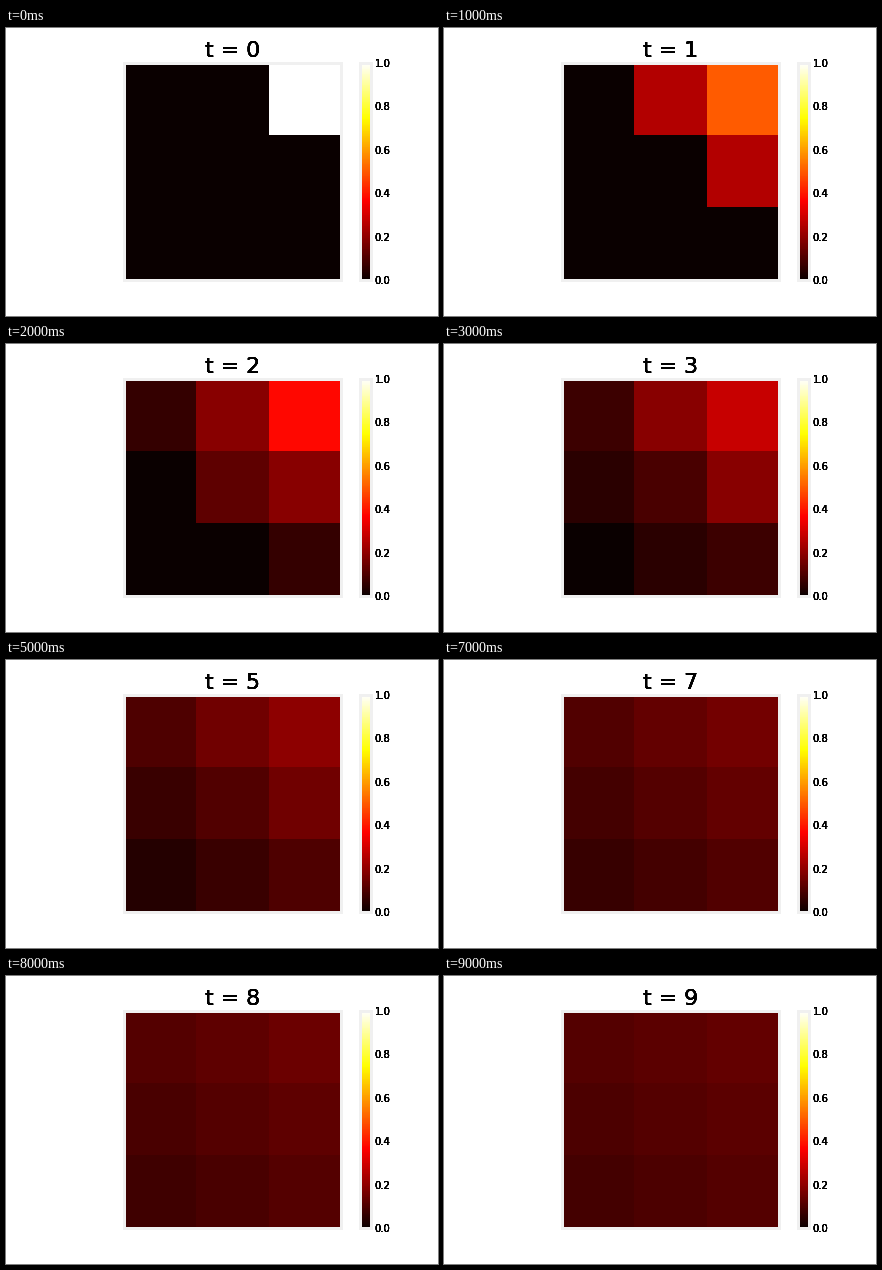
These frames come from a looping animation (432 px wide and 288 px high, 10000 ms). A matplotlib script:

```python
import numpy as np
import matplotlib.pyplot as plt
from matplotlib.animation import FuncAnimation

W, H, DPI = 432, 288, 72
N, STEPS = 3, 10
LAYERS = 6  # stacked text copies give hard, dark glyph edges

plt.rcParams.update({
    "font.family": "DejaVu Sans",
    "font.size": 10,
    "axes.edgecolor": "#f0f0f0",
    "axes.linewidth": 3,
    "axes.grid": False,
    "figure.subplot.left": 0.08,
    "figure.subplot.right": 0.95,
    "figure.subplot.bottom": 0.125,
    "figure.subplot.top": 0.88,
})


def diffuse(p):
    """One step of a random walk that stays put when it hits a wall."""
    q = np.pad(p, 1, mode="edge")
    return (q[:-2, 1:-1] + q[2:, 1:-1] + q[1:-1, :-2] + q[1:-1, 2:]) / 4


def history():
    p = np.zeros((N, N))
    p[0, -1] = 1
    states = [p]
    for _ in range(STEPS - 1):
        states.append(diffuse(states[-1]))
    return states


def layered(ax, x, y, s, **kw):
    return [ax.text(x, y, s, **kw) for _ in range(LAYERS)]


states = history()
fig, ax = plt.subplots(figsize=(W / DPI, H / DPI), dpi=DPI, facecolor="white")
im = ax.imshow(states[0], cmap="hot", vmin=0, vmax=1, interpolation="nearest")
ax.set_xticks([])
ax.set_yticks([])

bar = fig.colorbar(im, ax=ax)
bar.set_ticks([])
for v in np.linspace(0, 1, 6):
    for _ in range(LAYERS):
        bar.ax.annotate(f"{v:.1f}", (1, v), (3.5, 0), xycoords="axes fraction",
                        textcoords="offset points", ha="left",
                        va="center_baseline", annotation_clip=False)

title = [ax.annotate("", (0.5, 1), (0, 6), xycoords="axes fraction",
                     textcoords="offset points", ha="center", va="baseline",
                     fontsize=22, annotation_clip=False)
         for _ in range(LAYERS)]


def draw(t):
    im.set_data(states[t])
    for label in title:
        label.set_text(f"t = {t}")
    return [im, *title]


anim = FuncAnimation(fig, draw, frames=STEPS, init_func=lambda: draw(0),
                     interval=1000, repeat=True, repeat_delay=0, blit=False)
plt.show()
```
